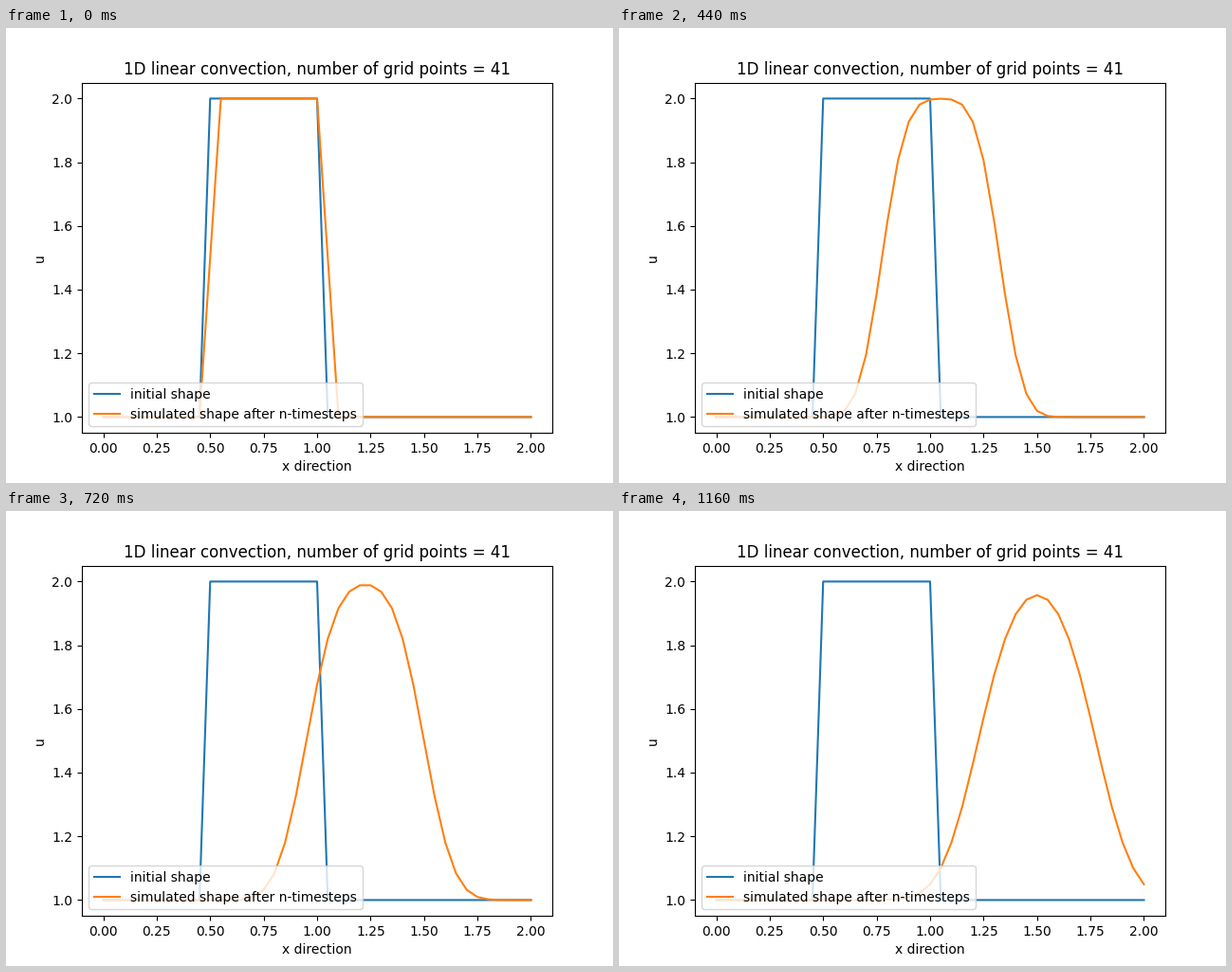
These frames come from a looping animation (640x480 px, 1.2 s). A matplotlib script:

```python
import numpy as np
import matplotlib.pyplot as plt
from matplotlib.animation import FuncAnimation

POINTS = 41
FRAMES = 30
INTERVAL = 40   # ms
COURANT = 0.5   # c * dt / dx

x = np.linspace(0, 2, POINTS)
initial = np.where((x > 0.49) & (x < 1.01), 2.0, 1.0)


def convect(u, steps):
    """Advance u with the first-order upwind scheme."""
    u = u.copy()
    for _ in range(steps):
        u[1:] -= COURANT * (u[1:] - u[:-1])
    return u


plt.rcParams["font.family"] = "DejaVu Sans"
fig, ax = plt.subplots(figsize=(6.4, 4.8), dpi=100)
ax.plot(x, initial, label="initial shape")
wave, = ax.plot(x, convect(initial, 1), label="simulated shape after n-timesteps")
ax.set_title(f"1D linear convection, number of grid points = {POINTS}")
ax.set_xlabel("x direction")
ax.set_ylabel("u")
ax.legend(loc="lower left")


def update(frame):
    wave.set_ydata(convect(initial, frame + 1))
    return wave,


anim = FuncAnimation(fig, update, frames=FRAMES, interval=INTERVAL,
                     repeat=True, repeat_delay=0)
plt.show()
```
